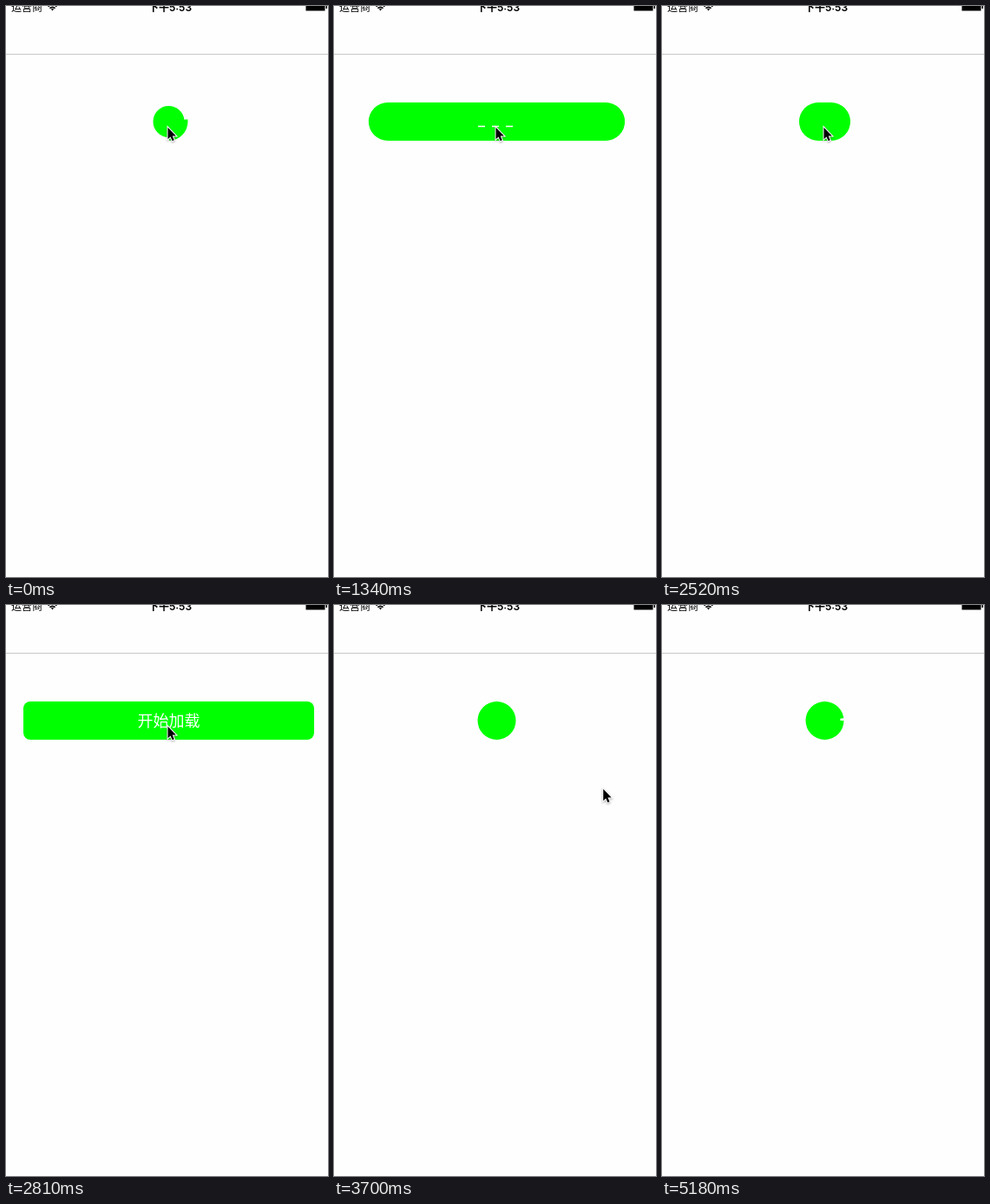
Recreate the animation shown at these times as an HTML page. Size 371 by 657 pixels, loop 5.22 s.

```html
<!DOCTYPE html>
<html lang="zh">
<head>
<meta charset="utf-8">
<style>
  html, body { margin: 0; height: 100%; overflow: hidden; background: #fefefe; }
  svg { display: block; }
  text { font-family: Inter, "Noto Sans CJK SC", "Noto Sans CJK", sans-serif; }
</style>
</head>
<body>
<svg width="371" height="657">
  <rect y="55" width="371" height="1" fill="#c8c8c8"/>
  <text x="6" y="5.5" font-size="12">运营商</text>
  <g fill="none" stroke="#000" stroke-width="1.7">
    <path d="M48.5 .6Q53.5-3.6 58.5.6M50.4 2.6Q53.5 0 56.6 2.6"/>
    <path d="M51.8 3.6Q53.5 2.2 55.2 3.6L53.5 5.4Z" fill="#000" stroke="none"/>
  </g>
  <text x="189" y="5.6" font-size="12" font-weight="600" text-anchor="middle">下午5:53</text>
  <path d="M345.5-4H367.5V5.5H345.5ZM368.5-1H370V3H368.5Z"/>

  <rect id="button" y="111" height="44" fill="#0f0"/>
  <text id="label" x="187.5" y="139.5" font-size="18" font-weight="300" fill="#fff" text-anchor="middle">开始加载</text>
  <path id="dots" d="M166 138.5h8m8 0h8m8 0h8" stroke="#fff" stroke-width="1.6"/>
  <circle id="arc" cx="187.5" cy="133" r="20.5" fill="none" stroke="#fefefe" stroke-width="5" pathLength="1"/>
  <path id="cursor" d="M0 0V13.4L3 10.6 5.1 15.4 7.3 14.5 5.2 9.7H9.4Z"
    stroke="#fff" stroke-width="2" paint-order="stroke" style="filter:drop-shadow(0 1px 1px #0005)"/>
</svg>
<script>
const LOOP = 5220, STEP = 148;
const FULL = 335, ROUND = 44;
const SHRINK = 300, EXPAND = 350, PAUSE = 49;
const $ = id => document.getElementById(id);

// Each load: when the spinner starts and when the button opens again (ms).
const loads = [
  { spin: -900, open: 240 },
  { spin: 1640, open: 2460 },
  { spin: 3740, open: Infinity }
];

const clamp = v => Math.min(1, Math.max(0, v));
const lerp = (a, b, p) => a + (b - a) * p;
const show = (id, on) => $(id).setAttribute("visibility", on ? "visible" : "hidden");

// Cubic ease-in-out with control points (.42, 0) and (.58, 1)
function ease(x) {
  x = clamp(x);
  let lo = 0, hi = 1;
  for (let i = 0; i < 20; i++) {
    const u = (lo + hi) / 2, v = 1 - u;
    if (3 * v * v * u * .42 + 3 * v * u * u * .58 + u * u * u < x) lo = u; else hi = u;
  }
  return lo * lo * (3 - 2 * lo);
}

// The pointer swings down to the right, rests, then drops off the bottom.
function pointer(t) {
  const p = clamp((t - 3404) / 600), out = clamp((t - 4440) / 400);
  const x = lerp(186.5, 353, 1 - (1 - p) ** 2) - 20 * out;
  const y = lerp(139.8, 608, p ** 2.65) + 75 * out;
  return `translate(${x} ${y})`;
}

function draw(t) {
  const shrinkAt = load => load.spin - PAUSE - SHRINK;
  const load = loads.findLast(l => t >= shrinkAt(l));
  const opening = t >= load.open;
  const width = opening
    ? lerp(ROUND, FULL, ease((t - load.open) / EXPAND))
    : lerp(FULL, ROUND, clamp((t - shrinkAt(load)) / SHRINK));
  const button = $("button");
  button.setAttribute("x", 187.5 - width / 2);
  button.setAttribute("width", width);
  button.setAttribute("rx", width > FULL - 1 ? 8 : 22);
  show("label", opening && width > 150);
  show("dots", !opening && width > 150);

  // The head runs round in 1 s while the tail lags, then the tail catches up in 0.5 s.
  const s = (t - load.spin) / 1000;
  const head = ease(s);
  const tail = .25 * head + .75 * ease((s - 1) / .5);
  show("arc", !opening && s > 0);
  $("arc").setAttribute("stroke-dasharray", `0 ${tail} ${head - tail} 2`);

  $("cursor").setAttribute("transform", pointer(t));
}

const start = performance.now();
function frame() {
  const t = (performance.now() - start) % LOOP;
  draw(Math.floor((t + 8) / STEP) * STEP); // the picture refreshes in steps
  requestAnimationFrame(frame);
}
frame();
</script>
</body>
</html>
```
